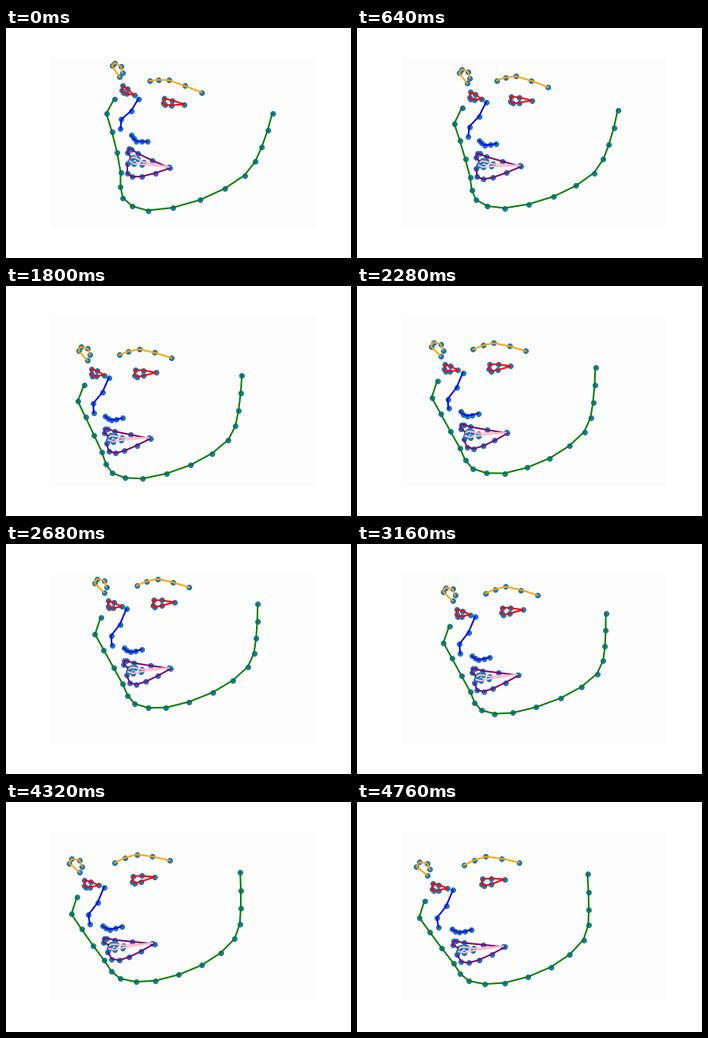
Animation, 432 px wide and 288 px high, one loop 4.8 s. Source, as a matplotlib script:

```python
import numpy as np
import matplotlib.pyplot as plt
from matplotlib.animation import FuncAnimation
from matplotlib.patches import Rectangle

W, H, DPI = 432, 288, 72
STEP, FRAMES = 40, 120

# Facial parts as (landmark count, colour, closed)
PARTS = [
    (17, "green", False),                         # jaw
    (5, "orange", False), (5, "orange", False),   # brows
    (4, "blue", False), (5, "blue", False),       # nose
    (6, "red", True), (6, "red", True),           # eyes
    (12, "purple", False), (8, "pink", False),    # lips
]


def spline(times, values):
    """Cubic Hermite curve through values at the given times."""
    times = np.asarray(times, float)
    values = np.asarray(values, float)
    slopes = np.gradient(values, times, axis=0)

    def at(t):
        i = int(np.clip(np.searchsorted(times, t, "right") - 1, 0, len(times) - 2))
        span = times[i + 1] - times[i]
        u = (t - times[i]) / span
        ease = u * u * (3 - 2 * u)
        return (values[i] + ease * (values[i + 1] - values[i])
                + span * u * (1 - u) ** 2 * slopes[i]
                - span * u * u * (1 - u) * slopes[i + 1])

    return at


def trace(steps, *keys):
    """One landmark per whole step along a curve through the key points."""
    curve = spline(steps, keys)
    return [curve(k) for k in range(steps[-1] + 1)]


def leaf(start, end, along, lift):
    """Landmarks around a leaf between two corners."""
    start, end = np.array(start), np.array(end)
    return [start + a * (end - start) + (0, b) for a, b in zip(along, lift)]


def eye(start, end):
    return leaf(start, end, (0, 0.03, 0.42, 1, 0.4, 0.1), (0, -6.5, -4.7, 0, 2.2, 2.5))


# The face at rest
upper_lip = trace((0, 1, 2, 4, 6), (137, 184), (130, 179), (131, 174), (143, 177), (189, 185))
lower_lip = trace((0, 2, 4, 5), (189, 185), (158, 201), (138, 202), (134, 192))
face = np.vstack([
    trace((0, 1, 2, 4, 6, 8, 10, 12, 14, 16),
          (101, 119), (94, 140), (105, 160), (129, 203), (145, 229),
          (185, 235), (242, 216), (285, 183), (296, 146), (299, 102)),
    [(105, 88), (93, 76), (96, 71), (105, 73), (108, 81)],
    trace((0, 2, 4), (146, 80), (172, 72), (212, 82)),
    [(133, 109), (125, 128), (114, 142), (115, 154)],
    trace((0, 2, 4), (130, 158), (138, 163), (152, 160)),
    eye((110, 105), (127, 106)),
    eye((166, 105), (193, 101)),
    upper_lip, lower_lip[1:],
    leaf((137, 184), (187, 184),
         (0, 0.04, 0.16, 0.32, 1, 0.3, 0.1, -0.02), (0, -1.5, -1, 1, 0, 4, 6, 4)),
])

# A few landmarks steer the head: five on the jaw, a brow, a mouth corner
GUIDES = [0, 4, 8, 12, 16, 24, 54]
rest = face[GUIDES]
POSES = {
    0: [(136, 89), (144, 181), (178, 229), (299, 185), (334, 107), (205, 66), (206, 176)],
    640: [(132, 100), (142, 187), (185, 226), (297, 182), (327, 103), (200, 61), (206, 174)],
    1360: [(123, 107), (139, 191), (185, 226), (299, 181), (320, 101), (191, 65), (201, 176)],
    2280: rest,
    3160: [(116, 103), (142, 185), (195, 212), (301, 163), (312, 87), (187, 54), (203, 165)],
    3880: [(94, 114), (126, 194), (189, 220), (289, 169), (298, 87), (167, 62), (187, 173)],
    4760: [(85, 124), (121, 202), (185, 227), (284, 173), (289, 90), (162, 69), (186, 182)],
}

# Nods between the poses
NODS = {
    480: (0, -2), 800: (0, -7), 1080: (0, 3), 1680: (-10, 7), 1960: (-14, 12),
    2820: (11, -20), 3360: (-4, 3), 3680: (-7, 4), 4200: (0, 4), 4500: (2, -5),
}


def warp_matrix(points, guides):
    """Thin-plate weights that carry points along with their guides."""
    points, guides = points / 100, guides / 100
    n = len(guides)

    def terms(p):
        r = np.linalg.norm(p[:, None] - guides[None], axis=2)
        return np.hstack([r * r * np.log(r + 1e-9), np.ones((len(p), 1)), p])

    system = np.zeros((n + 3, n + 3))
    system[:n] = terms(guides)
    system[n:, :n] = system[:n, n:].T
    return terms(points) @ np.linalg.inv(system)[:, :n]


warp = warp_matrix(face, rest)
guides_at = spline(list(POSES), list(POSES.values()))
nod_keys = sorted({**{t: (0, 0) for t in POSES}, **NODS}.items())
nod_at = spline(*zip(*nod_keys))

fig = plt.figure(figsize=(W / DPI, H / DPI), dpi=DPI, facecolor="white")
ax = fig.add_axes([0, 0, 1, 1])
ax.set_xlim(0, W)
ax.set_ylim(H, 0)
ax.axis("off")
ax.add_patch(Rectangle((56, 36), 332, 215, color="#fdfdfd", lw=0, zorder=0))

dots = ax.scatter(face[:, 0], face[:, 1], s=36, color="C0", linewidth=1)
lines = [ax.plot([], [], color=colour, lw=2)[0] for _, colour, _ in PARTS]


def draw(frame):
    t = frame * STEP
    points = warp @ guides_at(t) + nod_at(t) - 0.5
    dots.set_offsets(points)
    start = 0
    for line, (count, _, closed) in zip(lines, PARTS):
        part = points[start:start + count]
        start += count
        if closed:
            part = np.vstack([part, part[:1]])
        line.set_data(part[:, 0], part[:, 1])
    return [dots, *lines]


anim = FuncAnimation(fig, draw, frames=FRAMES, interval=STEP, repeat=True, repeat_delay=0)
plt.show()
```
